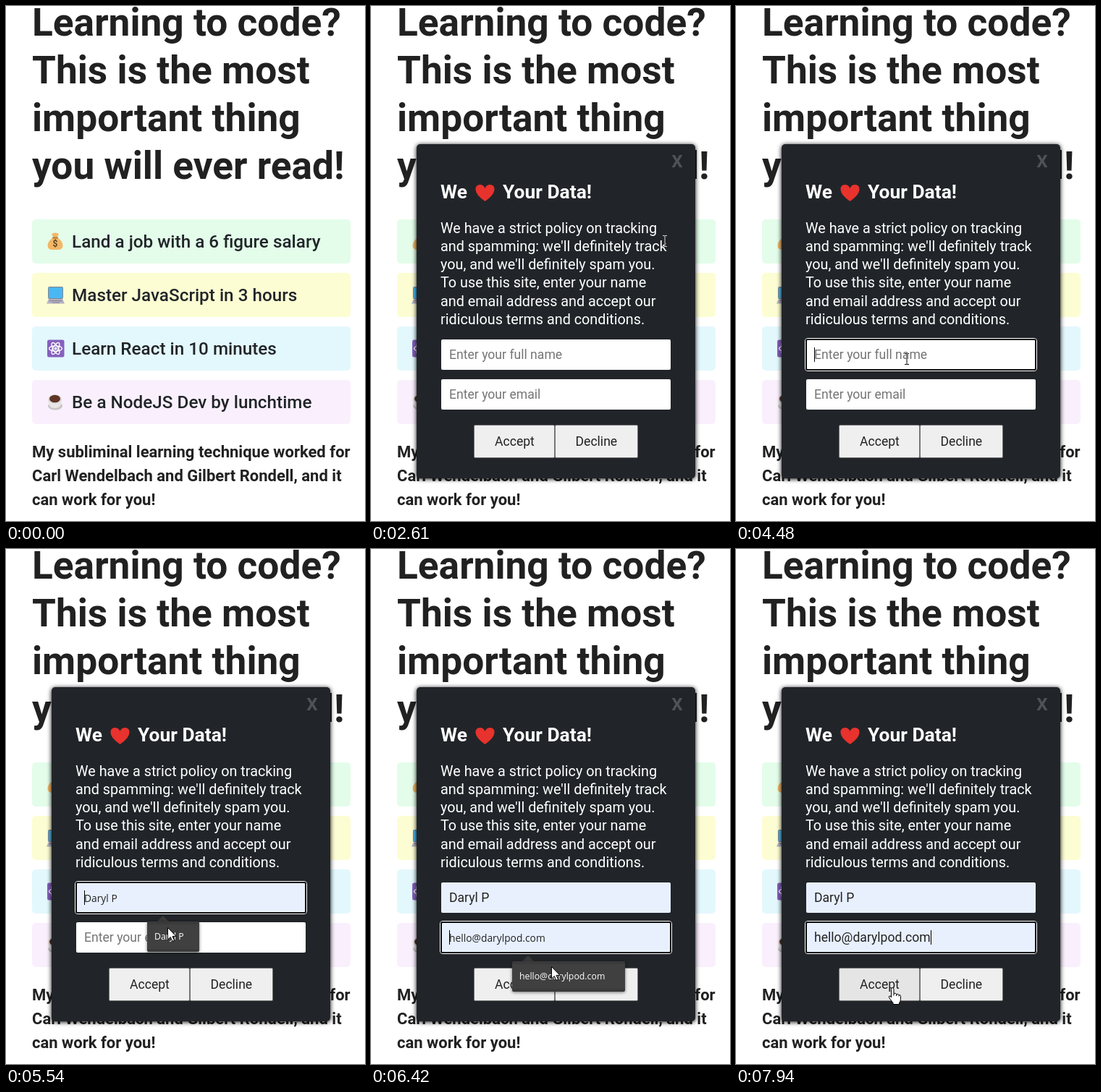
Recreate the animation shown at these times as an HTML page. Size 496 px wide and 712 px high, loop 8000 ms.

```html
<!DOCTYPE html>
<html lang="en">
<head>
<meta charset="utf-8">
<title>Cookie consent form</title>
<style>
html, body { margin: 0; width: 100%; height: 100%; overflow: hidden; background: #fff; }
svg { display: block; width: 496px; height: 712px; font-family: Roboto, sans-serif; fill: #212121; cursor: default; }
text { white-space: pre; }
.title { font-size: 53.24px; font-weight: 700; }
.item { font-size: 24.28px; font-weight: 500; fill: #212529; }
.note { font-size: 22px; font-weight: 700; }
.panel { fill: #212529; filter: drop-shadow(0 1px 3px #000); }
.love { font-size: 26.4px; font-weight: 700; fill: #fff; }
.body { font-size: 19.8px; fill: #fff; }
.form { font-size: 17.6px; fill: #222; }
.hint { fill: #757575; }
.sys { font-family: "Open Sans", "Noto Sans", sans-serif; font-size: 13.8px; }
.drop { font-family: "Open Sans", "Noto Sans", sans-serif; font-size: 12.3px; font-weight: 500; fill: #fff; }
.button { stroke: #767676; }
#beam { mix-blend-mode: difference; }
</style>
</head>
<body>
<svg viewBox="0 0 496 712">
  <g id="page"></g>

  <!-- list icons -->
  <g>
    <path d="M63 315q5-3 10 0l-2.500 5q8 5 8 11q0 6-7 6h-7q-7 0-7-6q0-6 8-11z" fill="#f2b766"/>
    <path d="M64 320.500h8" stroke="#b97a35" stroke-width="2"/>
    <text x="68" y="333" font-size="12" font-weight="700" text-anchor="middle" fill="#5b4326">$</text>
  </g>
  <g>
    <rect x="58.500" y="388.500" width="20" height="16" rx="1" fill="#49b8f2" stroke="#85848c"/>
    <path d="M59 405h19l3 6.500h-25z" fill="#b5b1c4"/>
    <path d="M60 407.500h17.500M64 410h10" stroke="#85818f"/>
  </g>
  <g transform="translate(68.500 473.500)">
    <rect x="-11.500" y="-12" width="23.500" height="24" rx="2.500" fill="#8560bd"/>
    <g fill="none" stroke="#fff" stroke-width="1.400">
      <ellipse rx="9" ry="3.600"/>
      <ellipse rx="9" ry="3.600" transform="rotate(60)"/>
      <ellipse rx="9" ry="3.600" transform="rotate(120)"/>
    </g>
    <circle r="1.900" fill="#fff"/>
  </g>
  <g>
    <ellipse cx="68" cy="553" rx="10" ry="5.500" fill="#c9c6c6"/>
    <path d="M58 543q0 13 9.500 13t9.500-13z" fill="#e9e7e6"/>
    <ellipse cx="67.500" cy="543.500" rx="9.500" ry="6.500" fill="#dddada"/>
    <ellipse cx="67.500" cy="543" rx="7.500" ry="5.300" fill="#5f3527"/>
  </g>

  <g id="modal">
    <rect class="panel" x="63" y="191" width="385" height="462" rx="5"/>
    <text x="423" y="223" font-size="24.200" font-weight="700" text-anchor="middle" fill="#505356">X</text>
    <text class="love" x="96" y="266">We</text>
    <path d="M157.500 270q-13-9-13-16.500q0-6.500 6-6.500q5 0 7 5q2-5 7-5q6 0 6 6.500q0 7.500-13 16.500z" fill="#e8322d"/>
    <text class="love" x="182" y="266">Your Data!</text>
    <g id="policy"></g>
    <g id="fields"></g>
    <rect id="accept" class="button" x="142.500" y="579.500" width="111" height="45" rx="1.500"/>
    <rect id="decline" class="button" x="254.500" y="579.500" width="114" height="45" rx="1.500"/>
    <text class="form" x="171" y="608">Accept</text>
    <text class="form" x="282.500" y="608">Decline</text>
    <rect id="caret" width="1" height="20" fill="#000"/>
    <g id="drops"></g>
  </g>

  <g id="pointer">
    <path id="arrow" d="M.500.500v16.500l3.800-3.600l2.600 6l2.700-1.200l-2.600-5.800h5z" fill="#fff" stroke="#000"/>
    <path id="beam" d="M-3-7.500h2.500l.500.500l.500-.500h2.500M0-7.500v15M-3 7.500h2.500l.500-.500l.500.500h2.500" fill="none" stroke="#fff"/>
    <path id="hand" d="M-1.500 13v-11.500q0-2 1.700-2t1.800 2v6q3-1 3.500 1q3-1 3.500 1q2.500-.500 2.500 2v4q0 3-2 5v2h-8.500v-2l-5-6.500q-1.500-2.300 0-3t2.500 2zM2 7.500v3M5.500 8.500v2.500M9 9.500v2" fill="#fff" stroke="#000"/>
  </g>
</svg>
<script>
const LOOP = 8000, BLINK = 530;
const OPEN = 1460, POINTER = 2060;
const $ = id => document.getElementById(id);
const label = (cls, x, y, s, id = "") => `<text class="${cls}" id="${id}" x="${x}" y="${y}">${s}</text>`;
const lines = (cls, x, y, step, list) => list.map((s, i) => label(cls, x, Math.round(y + i * step), s)).join("");
const show = (id, on) => $(id).style.display = on ? "" : "none";

const items = [
  ["#e3fdea", "Land a job with a 6 figure salary"],
  ["#fdfdd3", "Master JavaScript in 3 hours"],
  ["#e3f8fd", "Learn React in 10 minutes"],
  ["#faf0fd", "Be a NodeJS Dev by lunchtime"]
];

// focus, list opens, preview, accepted, blur; end = caret place after the text
const fields = [
  { id: "name", y: 461, hint: "Enter your full name", value: "Daryl P", wide: 72, end: 163,
    focus: 4480, list: 4540, preview: 4740, done: 5600, blur: 5950 },
  { id: "mail", y: 516, hint: "Enter your email", value: "hello@darylpod.com", wide: 156, end: 269,
    focus: 5950, list: 6070, preview: 6360, done: 6740, blur: LOOP }
];

// time, x, y
const path = [
  [2060, 370, 626], [2820, 420, 211], [3000, 423, 206], [3550, 277, 463],
  [3680, 256, 540], [3850, 240, 598], [4400, 236, 488], [4670, 236, 488],
  [4870, 223, 523], [5600, 223, 523], [5850, 238, 540], [6290, 238, 540],
  [6420, 249, 577], [6680, 249, 577], [6740, 256, 584], [7180, 216, 607]
];

$("page").innerHTML =
  lines("title", 36, 41, 66, ["Learning to code?", "This is the most", "important thing", "you will ever read!"]) +
  items.map(([color, s], i) =>
    `<rect x="36" y="${295 + 74 * i}" width="440" height="61" rx="5" fill="${color}"/>` +
    label("item", 91, 334 + 74 * i, s)).join("") +
  lines("note", 36, 624, 33, ["My subliminal learning technique worked for",
    "Carl Wendelbach and Gilbert Rondell, and it", "can work for you!"]);

$("policy").innerHTML = lines("body", 96, 313.7, 25.25, [
  "We have a strict policy on tracking", "and spamming: we'll definitely track",
  "you, and we'll definitely spam you.", "To use this site, enter your name",
  "and email address and accept our", "ridiculous terms and conditions."]);

$("fields").innerHTML = fields.map(f => `
  <rect id="${f.id}Box" x="97" y="${f.y}" width="317" height="42" rx="2"/>
  <g id="${f.id}Ring" fill="none">
    <rect x="95.500" y="${f.y - 1.5}" width="320" height="45" rx="3.500" stroke="#fff"/>
    <rect x="97" y="${f.y}" width="317" height="42" rx="2" stroke="#101010" stroke-width="2"/>
  </g>` +
  label("form hint", 108, f.y + 27, f.hint, f.id + "Hint") +
  label("form sys", 108, f.y + 26.5, f.value, f.id + "Preview") +
  label("form", 108, f.y + 27, f.value, f.id + "Value")).join("");

$("drops").innerHTML = fields.map(f => `
  <g id="${f.id}Drop">
    <path d="M209 ${f.y + 54}l8-8l8 8z" fill="#3a3a3a"/>
    <rect x="195" y="${f.y + 54}" width="${f.wide}" height="42" rx="2" fill="#3a3a3a" style="filter:drop-shadow(0 1px 2px #0008)"/>
    <rect id="${f.id}Row" x="195" y="${f.y + 58}" width="${f.wide}" height="34" fill="#404040"/>
    ${label("drop", 205, f.y + 79, f.value)}
  </g>`).join("");

function pointerAt(t) {
  const n = path.findIndex(p => p[0] > t);
  if (n < 0) return path[path.length - 1].slice(1);
  if (n === 0) return path[0].slice(1);
  const [t0, x0, y0] = path[n - 1], [t1, x1, y1] = path[n], k = (t - t0) / (t1 - t0);
  return [x0 + (x1 - x0) * k, y0 + (y1 - y0) * k];
}

const inside = (x, y, left, top, w, h) => x >= left && x < left + w && y >= top && y < top + h;

function draw(t) {
  const [x, y] = pointerAt(t);
  let caret = false, overDrop = false;

  for (const f of fields) {
    const focused = t >= f.focus && t < f.blur, done = t >= f.done, preview = t >= f.preview && !done;
    const open = t >= f.list && !done;
    show(f.id + "Ring", focused);
    show(f.id + "Hint", t < f.preview);
    show(f.id + "Preview", preview);
    show(f.id + "Value", done);
    show(f.id + "Drop", open);
    show(f.id + "Row", preview);
    $(f.id + "Box").setAttribute("fill", t >= f.preview ? "#e8f0fe" : "#fff");
    overDrop ||= open && inside(x, y, 195, f.y + 54, f.wide, 42);
    if (focused) {
      caret = Math.floor((t - (done ? f.done : f.focus)) / BLINK) % 2 === 0;
      $("caret").setAttribute("x", done ? f.end : 108);
      $("caret").setAttribute("y", f.y + 11);
    }
  }
  show("caret", caret);

  const active = t >= POINTER && !overDrop;
  const onAccept = active && inside(x, y, 142, 579, 112, 46);
  const onDecline = active && inside(x, y, 254, 579, 115, 46);
  const onText = active && (inside(x, y, 96, 295, 314, 150) || fields.some(f => inside(x, y, 97, f.y, 317, 42)));
  $("accept").setAttribute("fill", onAccept ? "#e5e5e5" : "#efefef");
  $("decline").setAttribute("fill", onDecline ? "#e5e5e5" : "#efefef");

  show("modal", t >= OPEN);
  show("pointer", t >= POINTER);
  const hand = onAccept || onDecline;
  show("hand", hand);
  show("beam", onText);
  show("arrow", !hand && !onText);
  $("pointer").setAttribute("transform", `translate(${Math.round(x)} ${Math.round(y)})`);
}

const start = performance.now();
function tick(now) {
  draw(Math.max(0, now - start) % LOOP);
  requestAnimationFrame(tick);
}
draw(0);
requestAnimationFrame(tick);
</script>
</body>
</html>
```
